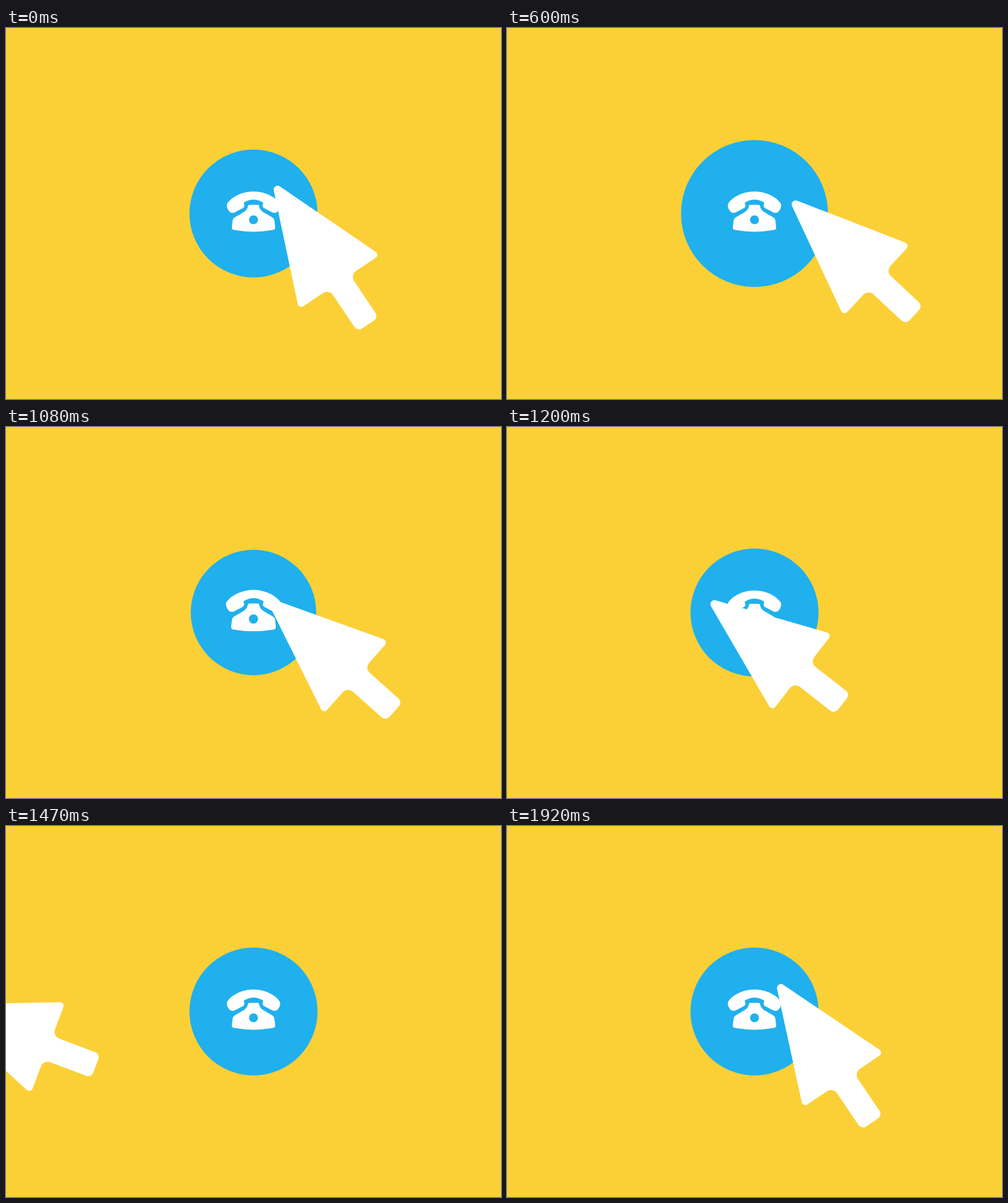
An HTML page for the animation above (1.95 s loop, 800x600 px).

```html
<!DOCTYPE html>
<html lang="en">
<head>
<meta charset="utf-8">
<title>Phone button and cursor</title>
<style>
  html, body { margin: 0; width: 100%; height: 100%; overflow: hidden; background: #fbd036; }
  svg { display: block; width: 100vw; height: 100vh; }
</style>
</head>
<body>
<svg viewBox="0 0 800 600">
  <rect width="800" height="600" fill="#fbd036"/>
  <g transform="translate(400 300)">
    <circle id="button" r="103.5" fill="#20b0ee"/>
    <g id="phone" fill="#fff">
      <path d="M-42.8-15.5C-35-28-17-35.5 0-35.5S35-28 42.8-15.5C44.2-11.5 41-4 37.5-2Q34-.3 30.5-1.8L17.5-8.5Q14.6-10 14.6-13L15.8-17.5Q0-27.5-15.8-17.5L-14.6-13Q-14.6-10-17.5-8.5L-30.5-1.8Q-34-.3-37.5-2C-41-4-44.2-11.5-42.8-15.5Z"/>
      <path d="M-8.5-13.7Q0-14.8 8.5-13.7C9.5-8 12-4 17-1.5L30 6Q33.3 8 33.7 11L35 22.5Q35.2 25.8 32 26.6Q16 29.4 0 29.4T-32 26.6Q-35.2 25.8-35 22.5L-33.7 11Q-33.3 8-30 6L-17-1.5C-12-4-9.5-8-8.5-13.7Z"/>
      <circle id="dial" cy="10.2" r="7.2" fill="#20b0ee"/>
    </g>
  </g>
  <path id="cursor" fill="#fff"/>
</svg>
<script>
const LOOP = 1950, STEP = 30;
const byId = id => document.getElementById(id);
const lerp = (a, b, p) => a + (b - a) * p;
const mix = (a, b, p) => a.map((v, i) => lerp(v, b[i], p));

function ease(t, from, to) {
  const u = Math.min(1, Math.max(0, (t - from) / (to - from)));
  return u * u * (3 - 2 * u);
}

// Eased value through [time, value] pairs.
function track(t, keys) {
  let value = keys[0][1];
  for (let i = 1; i < keys.length; i++) {
    if (t >= keys[i - 1][0]) {
      value = lerp(keys[i - 1][1], keys[i][1], ease(t, keys[i - 1][0], keys[i][0]));
    }
  }
  return value;
}

// Arrow along the x axis, centred on its middle, tip at the left.
byId('cursor').setAttribute('d',
  'M-128.9-6A6.5 6.5 0 0 0-128.9 6L45.1 75.8A6 6 0 0 0 53.3 70.2' +
  'L53.3 32A11.5 11.5 0 0 1 64.8 20.5L127 20.5A9 9 0 0 0 136 11.5' +
  'L136-11.5A9 9 0 0 0 127-20.5L64.8-20.5A11.5 11.5 0 0 1 53.3-32' +
  'L53.3-70.2A6 6 0 0 0 45.1-75.8Z');

// Poses are [x, y, angle].
const HOVER = [509.4, 366.6, 56.2];
const REST = [558.9, 371.6, 43.1];
const LEAVING = [285.9, 355.6, 31.8];
const ENTRY = [939.5, 392.4, 24];

function cursorPose(t) {
  if (t < 952) return mix(HOVER, REST, ease(t, 0, 410));
  if (t < 1572) return mix(REST, LEAVING, ((t - 952) / 368) ** 2);
  return mix(ENTRY, HOVER, ease(t, 1572, 1942));
}

function render(t) {
  const [x, y, angle] = cursorPose(t);
  const press = track(t, [[630, 1], [820, 0.95], [1020, 1]]);
  const button = track(t, [[420, 1], [660, 1.175], [840, 0.9], [1178, 1]]);
  const phone = track(t, [[600, 1], [840, 1.2], [1160, 1]]);
  byId('cursor').setAttribute('transform', `translate(${x} ${y}) rotate(${angle}) scale(${press})`);
  byId('button').setAttribute('transform', `scale(${button})`);
  byId('phone').setAttribute('transform', `scale(${phone})`);
}

const start = performance.now();
function tick() {
  const t = (performance.now() - start) % LOOP;
  render(Math.floor(t / STEP) * STEP);
  requestAnimationFrame(tick);
}
tick();
</script>
</body>
</html>
```
